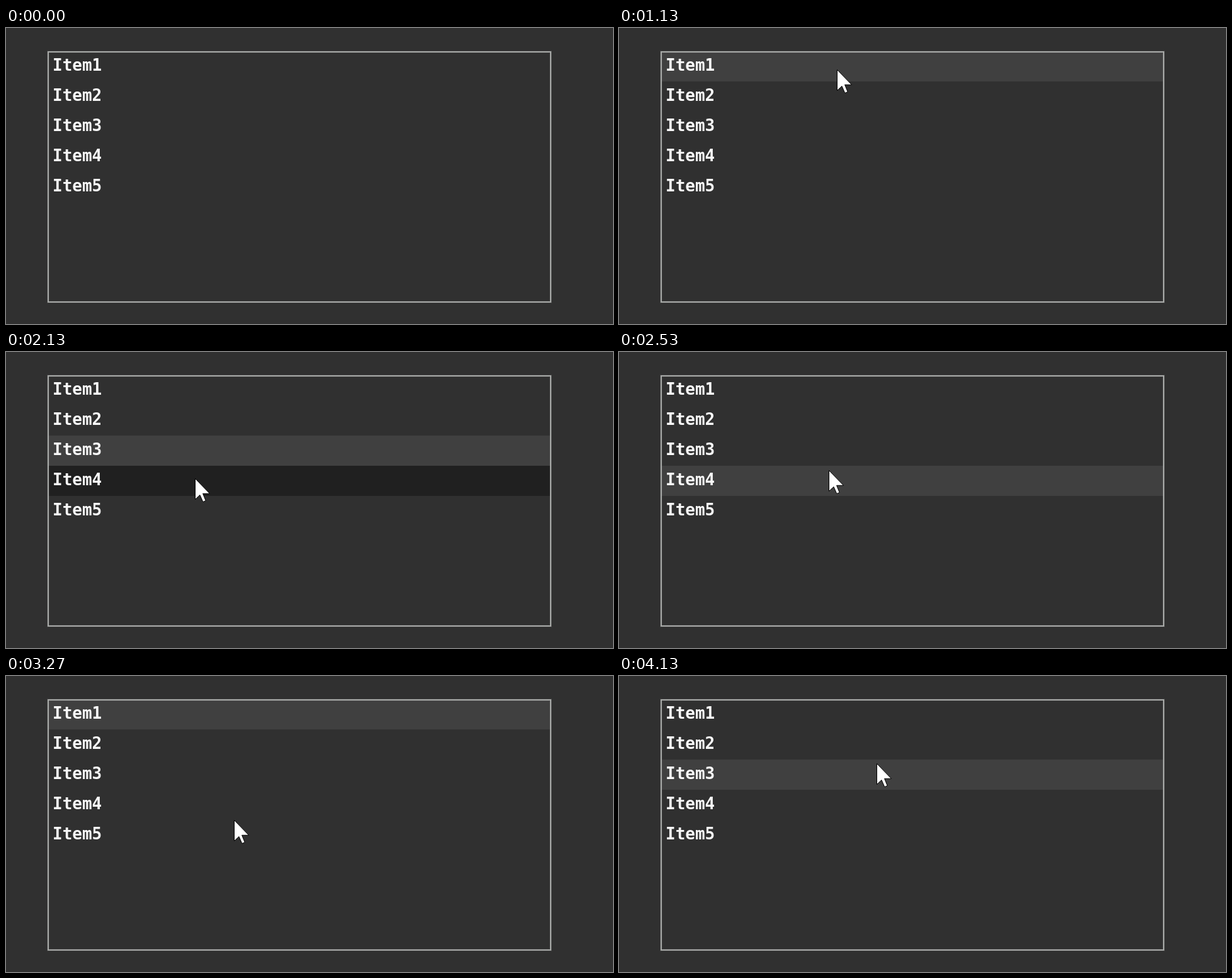
Write an HTML page that moves like this. It is 964 px wide and 471 px high and loops after 4260 ms.

```html
<!DOCTYPE html>
<html lang="en">
<head>
<meta charset="utf-8">
<title>List selection</title>
<style>
  html, body { margin: 0; width: 100%; height: 100%; overflow: hidden; background: #303030; }
  svg { display: block; }
  text { font: bold 26px "DejaVu Sans Mono", monospace; fill: #f8f8f8; }
  .frame { fill: none; stroke: #a8aaa8; }
</style>
</head>
<body>
<svg width="964" height="471" viewBox="0 0 964 471">
  <g id="rows"></g>
  <rect class="frame" x="67" y="38" width="798" height="398" stroke-width="4" opacity=".12"/>
  <rect class="frame" x="67" y="38" width="798" height="398" stroke-width="2"/>
  <g id="labels"></g>
  <path id="cursor" d="M.5 .5V33.5L8 26.5L12.8 37.5L17.2 35.6L12.6 24.3H23.5Z"
        fill="#fff" stroke="#000" stroke-width="1"/>
</svg>
<script>
const LOOP = 4260, FPS = 15, ROW = 48, TOP = 37, HOLD = 2;
const NORMAL = "#303030", PRESSED = "#202020", SELECTED = "#404040";

// The pointer travels between stops; times are in ticks of 1/15 s.
// A stop with a release time clicks the row under it.
const origin = { x: 385, y: 184 };
const stops = [
  { from: 5, to: 11, x: 346, y: 66, release: 17 },
  { from: 17, to: 20, x: 338, y: 114, release: 23 },
  { from: 23, to: 27, x: 327, y: 155, release: 29 },
  { from: 28, to: 32, x: 300, y: 201, release: 34 },
  { from: 34, to: 36, x: 317, y: 228 },
  { from: 36, to: 42, x: 378, y: 72, release: 44 },
  { from: 44, to: 51, x: 358, y: 268, release: 54 },
  { from: 54, to: 60, x: 409, y: 139, release: 62 }
];

function add(parent, tag, attrs) {
  const el = document.createElementNS("http://www.w3.org/2000/svg", tag);
  for (const key in attrs) el.setAttribute(key, attrs[key]);
  return document.getElementById(parent).appendChild(el);
}

const rows = Array.from({ length: 5 }, (_, i) => {
  const y = TOP + i * ROW;
  add("labels", "text", { x: 74, y: y + 31 }).textContent = "Item" + (i + 1);
  return add("rows", "rect", { x: 67, y, width: 797, height: ROW });
});
const cursor = document.getElementById("cursor");

const ease = k => k * k * (3 - 2 * k);
const mix = (a, b, k) => Math.round(a + (b - a) * k);

function stateAt(tick) {
  let { x, y } = origin, selected = -1, pressed = -1;
  for (const stop of stops) {
    const k = ease(Math.min(1, Math.max(0, (tick - stop.from) / (stop.to - stop.from))));
    x = mix(x, stop.x, k);
    y = mix(y, stop.y, k);
    const row = Math.floor((stop.y - TOP) / ROW);
    if (tick >= stop.release) selected = row;
    else if (tick >= stop.release - HOLD) pressed = row;
  }
  return { x, y, selected, pressed };
}

function draw(ms) {
  const tick = Math.floor((ms + 3.4) * FPS / 1000);
  const { x, y, selected, pressed } = stateAt(tick);
  rows.forEach((el, i) => {
    el.setAttribute("fill", i === pressed ? PRESSED : i === selected ? SELECTED : NORMAL);
  });
  cursor.setAttribute("visibility", tick < stops[0].from ? "hidden" : "visible");
  cursor.setAttribute("transform", `translate(${x} ${y})`);
}

const start = performance.now();
function frame() {
  draw((performance.now() - start) % LOOP);
  requestAnimationFrame(frame);
}
frame();
</script>
</body>
</html>
```
